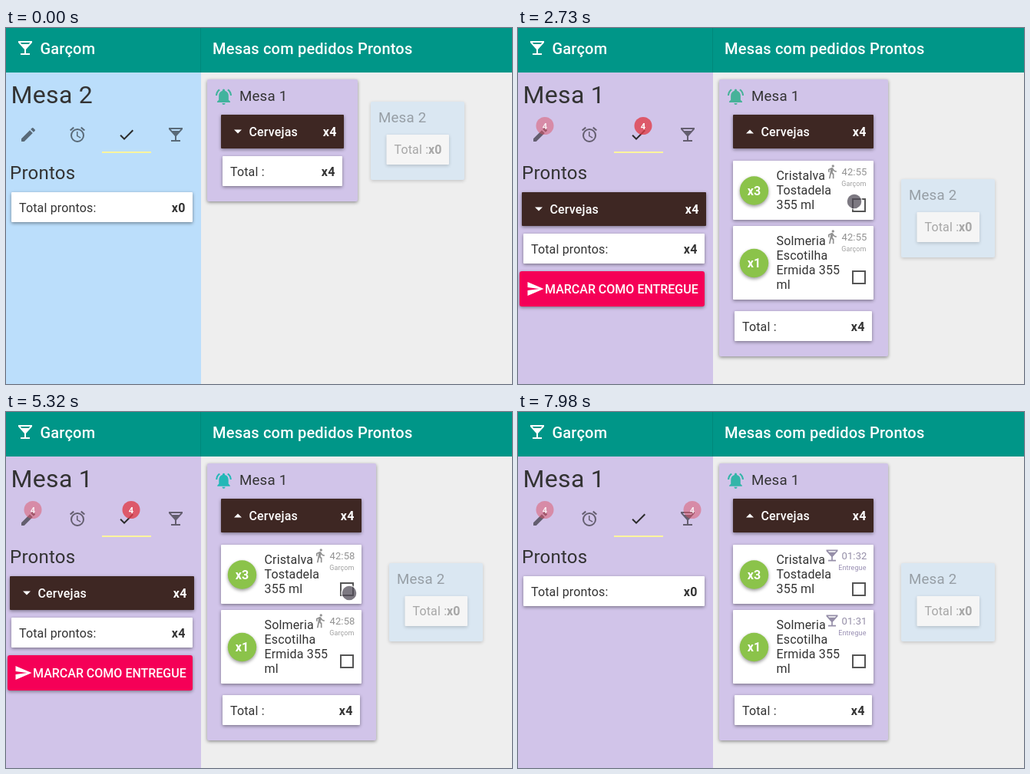
Animation, 659 px wide and 464 px high, one loop 8050 ms. Source, as an HTML page with a canvas:

```html
<!DOCTYPE html>
<html lang="pt-BR">
<head>
<meta charset="utf-8">
<title>Mesas com pedidos Prontos</title>
<style>
  html, body { margin: 0; width: 100%; height: 100%; overflow: hidden; background: #eee; }
  canvas { display: block; width: 659px; height: 464px; }
</style>
</head>
<body>
<canvas id="stage"></canvas>
<script>
const W = 659, H = 464, LOOP = 8050, STEP = 70;
const canvas = document.getElementById('stage');
const ctx = canvas.getContext('2d');
const dpr = window.devicePixelRatio || 1;
canvas.width = W * dpr;
canvas.height = H * dpr;

const TEAL = '#009688', BLUE = '#bbdefb', LILAC = '#d1c4e9', BROWN = '#3e2723', INK = '#333';

// Moments of the story, in ms
const PRESS = 910, EXPAND = 1400, SWITCH = 1540, READY = 2380, DELIVER = 6160, TICK = 1300;

const ICON = {
  bar: 'M21 5V3H3v2l8 9v5H6v2h12v-2h-5v-5l8-9zM7.4 7L5.7 5h12.7l-1.8 2z',
  edit: 'M3 17.25V21h3.75L17.8 9.9l-3.75-3.75zM20.7 7a1 1 0 0 0 0-1.4l-2.3-2.3a1 1 0 0 0-1.4 0l-1.9 1.8 3.75 3.75z',
  check: 'M9 16.2L4.8 12l-1.4 1.4L9 19 21 7l-1.4-1.4z',
  send: 'M2 21L23 12 2 3v7l15 2-15 2z',
  bell: 'M7.6 4.1L6.1 2.65A10.6 10.6 0 0 0 2 10.5h2a8.4 8.4 0 0 1 3.6-6.4zM20 10.5h2a10.6 10.6 0 0 0-4.1-7.85l-1.5 1.45a8.4 8.4 0 0 1 3.6 6.4z' +
    'M18 11c0-3.1-1.6-5.6-4.5-6.3V4a1.5 1.5 0 0 0-3 0v.7C7.6 5.4 6 7.9 6 11v5l-2 2v1h16v-1l-2-2zM10 20a2 2 0 0 0 4 0z',
  walk: 'M13.5 5.5a2 2 0 1 0 0-4 2 2 0 0 0 0 4zM9.8 8.9L7 23h2.1l1.8-8 2.1 2v6h2v-7.5l-2.1-2 .6-3c1.3 1.5 3.3 2.5 5.5 2.5v-2c-1.9 0-3.5-1-4.3-2.4l-1-1.6c-.6-.9-1.5-1.2-2.5-.9L6 8.3V13h2V9.6z',
  alarm: 'M22 5.7l-4.6-3.85-1.3 1.55 4.6 3.85zM7.9 3.4L6.6 1.85 2 5.7l1.3 1.55zM12.5 8H11v6l4.75 2.85.75-1.25-4-2.35z' +
    'M12 4a9 9 0 1 0 0 18 9 9 0 0 0 0-18zm0 16a7 7 0 1 1 0-14 7 7 0 0 1 0 14z'
};
for (const name in ICON) ICON[name] = new Path2D(ICON[name]);

const lerp = (a, b, k) => a + (b - a) * k;
const clamp = v => Math.max(0, Math.min(1, v));
const ease = k => k * k * (3 - 2 * k);

// Interpolates keys shaped [time, value, value...]
function track(keys, t, curve = k => k) {
  if (t <= keys[0][0]) return keys[0].slice(1);
  for (let i = 1; i < keys.length; i++) {
    const a = keys[i - 1], b = keys[i];
    if (t <= b[0]) {
      const k = curve((t - a[0]) / (b[0] - a[0]));
      return a.slice(1).map((v, n) => lerp(v, b[n + 1], k));
    }
  }
  return keys[keys.length - 1].slice(1);
}

function text(str, x, y, size, color, weight = 400, align = 'left', spacing = 0.01) {
  ctx.font = `${weight} ${size}px Roboto, sans-serif`;
  ctx.letterSpacing = size * spacing + 'px';
  ctx.fillStyle = color;
  ctx.textAlign = align;
  ctx.fillText(str, x, y);
}

function icon(name, x, y, color, scale = 1) {
  ctx.save();
  ctx.translate(x, y);
  ctx.scale(scale, scale);
  ctx.fillStyle = color;
  ctx.fill(ICON[name], 'evenodd');
  ctx.restore();
}

function shadow(alpha, blur, dy) {
  ctx.shadowColor = `rgba(0,0,0,${alpha})`;
  ctx.shadowBlur = blur * dpr;
  ctx.shadowOffsetY = dy * dpr;
}

function paper(x, y, w, h, color, radius = 1, depth = 0.42) {
  ctx.save();
  shadow(depth, 4, 1.5);
  ctx.fillStyle = color;
  ctx.beginPath();
  ctx.roundRect(x, y, w, h, radius);
  ctx.fill();
  ctx.restore();
}

function disc(x, y, r, color) {
  ctx.fillStyle = color;
  ctx.beginPath();
  ctx.arc(x, y, r, 0, 7);
  ctx.fill();
}

function caret(x, y, dir) {
  ctx.fillStyle = '#fff';
  ctx.beginPath();
  ctx.moveTo(x - 5, y - 2.5 * dir);
  ctx.lineTo(x + 5, y - 2.5 * dir);
  ctx.lineTo(x, y + 2.5 * dir);
  ctx.fill();
}

function group(x, y, w, dir) {
  paper(x, y, w, 44, BROWN);
  caret(x + 22, y + 22, dir);
  text('Cervejas', x + 36.5, y + 28, 16, '#fff', 500);
  text('x4', x + w - 9.5, y + 28, 16, '#fff', 700, 'right');
}

function total(label, count, x, y, w) {
  paper(x, y, w, 39, '#fff');
  text(label, x + 10, y + 25.5, 16, INK);
  text(count, x + w - 9.5, y + 25.5, 16, INK, 700, 'right');
}

function badge(x, active) {
  disc(x + 6, 127.5, 11.5, active ? 'rgba(224,62,74,.8)' : 'rgba(222,82,102,.5)');
  text('4', x + 6, 131.5, 11, active ? '#fff' : 'rgba(255,255,255,.85)', 700, 'center');
}

function header() {
  ctx.fillStyle = TEAL;
  ctx.fillRect(0, 0, W, 58);
  ctx.fillStyle = 'rgba(0,0,0,.09)';
  ctx.fillRect(253, 0, 1, 58);
  icon('bar', 13, 14, '#fff');
  text('Garçom', 44.5, 34, 20, '#fff', 500);
  text('Mesas com pedidos Prontos', 269, 34, 20, '#fff', 500);
}

function sidePanel(t) {
  const first = t >= SWITCH;
  const ready = t >= READY && t < DELIVER;
  const done = t >= DELIVER;
  ctx.fillStyle = first ? LILAC : BLUE;
  ctx.fillRect(0, 58, 254, H - 58);
  text(first ? 'Mesa 1' : 'Mesa 2', 6.5, 97.5, 32, INK);

  const dim = 'rgba(0,0,0,.52)';
  icon('edit', 17, 127, dim);
  icon('alarm', 81, 127, dim);
  icon('check', 145, 127, '#2b2b2b');
  icon('bar', 209, 127, dim);
  if (ready || done) badge(29, false);
  if (ready) badge(157, true);
  if (done) badge(221, false);
  ctx.fillStyle = '#fff59d';
  ctx.fillRect(125, 161, 64, 2);

  text('Prontos', 5, 197, 24, INK);
  if (ready) {
    group(5, 214, 240, 1);
    total('Total prontos:', 'x4', 7, 268, 236);
    paper(2, 317, 241, 46, '#f50057', 3);
    icon('send', 10.5, 328, '#fff');
    text('MARCAR COMO ENTREGUE', 35, 346, 16, '#fff', 500, 'left', 0);
  } else {
    total('Total prontos:', 'x0', 7, 214, 236);
  }
}

function clock(s) {
  const pad = n => String(n).padStart(2, '0');
  return pad(Math.floor(s / 60)) + ':' + pad(s % 60);
}

function item(y, h, count, lines, seconds, done) {
  paper(280, y, 183, h, '#fff');
  const mid = y + h / 2;
  ctx.save();
  shadow(0.4, 4, 2);
  disc(307.5, mid + 0.5, 18.7, '#8bc34a');
  ctx.restore();
  text(count, 307.5, mid + 6, 16, '#fff', 700, 'center');
  lines.forEach((line, i) => text(line, 336.5, y + 25 + i * 19, 16, INK));
  const grey = done ? '#958ea8' : '#929292';
  icon(done ? 'bar' : 'walk', 399, y + 4, grey, 20 / 24);
  text(clock(seconds), 454.5, y + 19, 13, grey, 400, 'right');
  text(done ? 'Entregue' : 'Garçom', 453.5, y + 33, 9, done ? '#9a90b4' : '#a0a0a0', 400, 'right');
  ctx.strokeStyle = '#555';
  ctx.lineWidth = 2;
  ctx.strokeRect(436, Math.floor(mid + 11.5), 16, 16);
}

function bell(t) {
  const beat = [[0, .26], [200, .08], [250, .37], [308, .73], [400, 1], [686, .28], [830, .2], [1022, .26]];
  const [k] = track(beat, t % 1022);
  const color = `rgb(${lerp(0, 255, k)},${lerp(188, 152, k)},${lerp(212, 0, k)})`;
  const s = 1 + 0.22 * k;
  icon('bell', 283.5 - 12 * s, 89.5 - 12 * s, color, s);
}

function ripple(t) {
  if (t < PRESS || t >= EXPAND) return;
  const k = clamp((t - PRESS + STEP) / 280);
  disc(399, 135, lerp(4, 16, k), 'rgba(255,255,255,.27)');
}

function openTable(t, k) {
  const bottom = lerp(226, 428, k);
  const w = lerp(196, 220, k);
  paper(262, 67, w, bottom - 67, LILAC, 2);
  bell(t);
  text('Mesa 1', 304, 94.5, 18.72, INK);
  group(280, 113, lerp(160, 183, k), k > 0 ? -1 : 1);
  ripple(t);

  if (k > 0) {
    const sec = 42 * 60 + 54 + Math.floor((t - TICK) / 1000);
    const done = t >= DELIVER;
    const since = 91 + (t >= 7300 ? 1 : 0);
    ctx.save();
    ctx.beginPath();
    ctx.rect(262, 158, w, Math.max(0, bottom - 62 - 158));
    ctx.clip();
    ctx.globalAlpha = k;
    item(173, 77, 'x3', ['Cristalva', 'Tostadela', '355 ml'], done ? since : sec, done);
    const stale = t < 6550;
    item(258, 96, 'x1', ['Solmeria', 'Escotilha', 'Ermida 355', 'ml'],
      done && !stale ? since - 1 : Math.min(sec, 42 * 60 + 59), done);
    ctx.restore();
  }
  total('Total :', 'x4', 282, lerp(167, 369, k), lerp(156, 179, k));
}

function idleTable(k) {
  const x = lerp(475, 499, k), y = lerp(96, 197, k);
  const faint = 'rgba(51,51,51,.4)';
  paper(x, y, 122, 102, '#dae7f2', 2, 0.18);
  paper(x + 20.5, y + 43, 81.5, 39, '#f5f5f5', 1, 0.18);
  text('Mesa 2', x + 10, y + 27, 18.72, faint);
  text('Total :', x + 30.5, y + 68, 16, faint);
  text('x0', x + 75, y + 68, 16, faint, 700);
}

const PATH = [
  [70, 550, 413], [840, 400, 157], [2240, 400, 157], [2660, 438, 226], [3080, 438, 226],
  [3640, 430, 28], [3990, 430, 71], [4830, 425, 205], [5180, 447, 236], [5320, 447, 236],
  [5600, 170, 313], [6020, 170, 313], [6400, 184, 318], [6600, 184, 318],
  [6790, 230, 300], [7200, 420, 38], [7630, 607, 452]
];

function pointer(t) {
  if (t < 70 || t >= 7700 || (t >= 4060 && t < 4830)) return;
  const [x, y] = track(PATH, t, ease);
  disc(x, y, 9.5, 'rgba(80,74,86,.74)');
  ctx.strokeStyle = 'rgba(255,255,255,.68)';
  ctx.lineWidth = 1.5;
  ctx.beginPath();
  ctx.arc(x, y, 10, 0, 7);
  ctx.stroke();
}

function draw(t) {
  ctx.setTransform(dpr, 0, 0, dpr, 0, 0);
  ctx.fillStyle = '#eee';
  ctx.fillRect(0, 0, W, H);
  const k = ease(clamp((t - EXPAND) / 280));
  header();
  sidePanel(t);
  openTable(t, k);
  idleTable(k);
  pointer(t);
}

const start = performance.now();
function loop() {
  const t = (performance.now() - start) % LOOP;
  draw(Math.floor(t / STEP) * STEP);
  requestAnimationFrame(loop);
}
loop();
</script>
</body>
</html>
```
